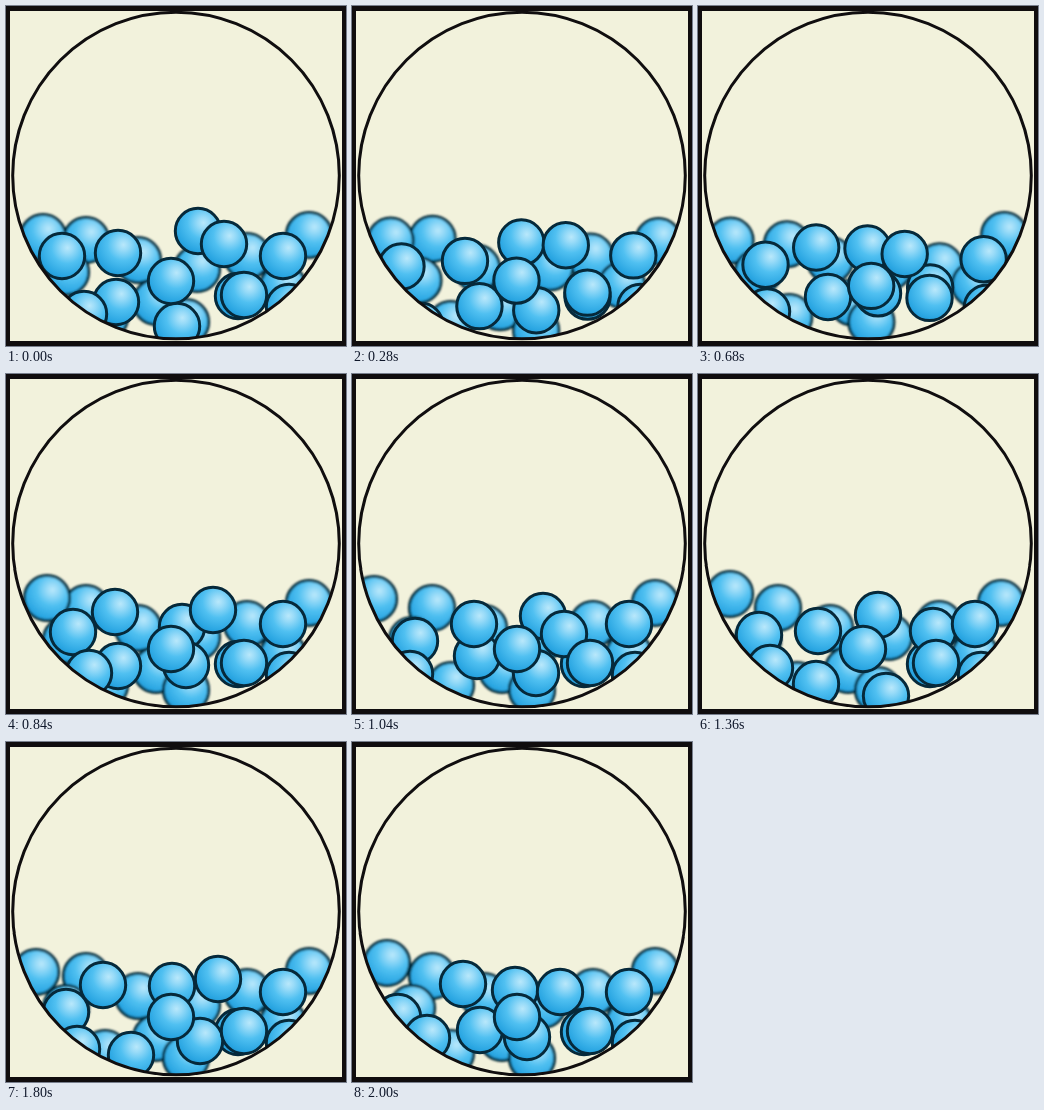
Recreate the animation shown at these times as an HTML page. Size 340 by 340 pixels, loop 2.04 s.

```html
<!DOCTYPE html>
<html lang="en">
<head>
<meta charset="utf-8">
<title>Jostling balls</title>
<style>
  html, body { margin: 0; width: 100%; height: 100%; overflow: hidden; background: #100d0e; }
  svg { display: block; width: 100vw; height: 100vh; }
</style>
</head>
<body>
<svg viewBox="0 0 340 340">
  <defs>
    <radialGradient id="shade" cx=".62" cy=".32" r=".78">
      <stop offset="0" stop-color="#b9e8fb"/>
      <stop offset=".16" stop-color="#98dbf8"/>
      <stop offset=".45" stop-color="#50c0f1"/>
      <stop offset=".8" stop-color="#2aa6e2"/>
      <stop offset="1" stop-color="#1d8fcd"/>
    </radialGradient>
    <filter id="soft" x="-20%" y="-20%" width="140%" height="140%">
      <feGaussianBlur stdDeviation="1"/>
    </filter>
    <clipPath id="bowl"><circle cx="170" cy="169.5" r="163"/></clipPath>
  </defs>
  <rect width="340" height="340" fill="#100d0e"/>
  <rect x="4" y="5" width="332" height="330" fill="#f2f2dc"/>
  <g clip-path="url(#bowl)" fill="url(#shade)" stroke="#06293a">
    <g id="back" stroke-width="2.8" filter="url(#soft)"></g>
    <g id="front" stroke-width="3"></g>
  </g>
  <circle cx="170" cy="169.5" r="163.3" fill="none" stroke="#100e0f" stroke-width="3"/>
</svg>
<script>
const LOOP = 2040, STEP = 40;
const KEYS = [0, 13, 21, 26, 34, 45, 50, 51]; // in steps; the last one closes the loop
const balls = [];

// A ball has either one resting place or a path with a point for each key.
function ball(layer, ...points) {
  const node = document.createElementNS('http://www.w3.org/2000/svg', 'circle');
  node.setAttribute('r', 22.7);
  document.getElementById(layer).append(node);
  balls.push({ node, points, seed: balls.length + 1 });
}

ball('back', [303, 229]);
ball('back', [80, 234]);
ball('back', [37, 231], [24, 234], [41, 224], [22, 225], [32, 220], [30, 230], [35, 221]);
ball('back', [132, 254]);
ball('back', [241, 250]);
ball('back', [99, 311]);
ball('back', [60, 266]);
ball('back', [277, 281]);
ball('back', [150, 296]);
ball('back', [191, 263]);
ball('back', [180, 316]);

ball('front', [232, 290]);
ball('front', [283, 301]);
ball('front', [192, 225], [163, 232], [176, 253], [191, 242], [180, 241], [166, 244], [163, 248]);
ball('front', [110, 296], [134, 290], [112, 292], [125, 282], [118, 310], [125, 313], [128, 288]);
ball('front', [56, 250], [47, 262], [67, 258], [63, 267], [61, 261], [60, 270], [46, 275]);
ball('front', [78, 308], [65, 312], [83, 299], [58, 300], [72, 294], [71, 307], [75, 296]);
ball('front', [112, 247], [110, 245], [109, 238], [122, 250], [120, 257], [97, 243], [111, 242]);
ball('front', [218, 238], [211, 241], [207, 236], [212, 260], [235, 257], [212, 237], [208, 250]);
ball('front', [171, 320], [180, 292], [180, 291], [184, 299], [188, 322], [194, 299], [175, 295]);
ball('front', [165, 275]);
ball('front', [277, 250]);
ball('front', [238, 289]);

function random(n) {
  const v = Math.sin(n * 127.1 + 11.7) * 43758.5453;
  return v - Math.floor(v);
}

// Jitter that fades to nothing at both ends of a span.
function wiggle(seed, span, u) {
  const halfWaves = 1 + Math.round((KEYS[span + 1] - KEYS[span]) * (.15 + .2 * random(seed)));
  return (random(seed + span * 7.3) * 2 - 1) * 11 * Math.sin(Math.PI * halfWaves * u);
}

function draw(time) {
  const t = time % LOOP;
  const step = t < 2 * STEP ? 0 : Math.floor(t / STEP);
  const span = KEYS.findIndex((key, i) => step < KEYS[i + 1]);
  const u = (step - KEYS[span]) / (KEYS[span + 1] - KEYS[span]);
  for (const { node, points, seed } of balls) {
    const from = points[span % points.length];
    const to = points[(span + 1) % points.length];
    ['cx', 'cy'].forEach((name, axis) => {
      const place = from[axis] + (to[axis] - from[axis]) * u;
      node.setAttribute(name, place + wiggle(seed + axis * 50, span, u));
    });
  }
}

const start = performance.now();
function tick() {
  draw(performance.now() - start);
  requestAnimationFrame(tick);
}
tick();
</script>
</body>
</html>
```
